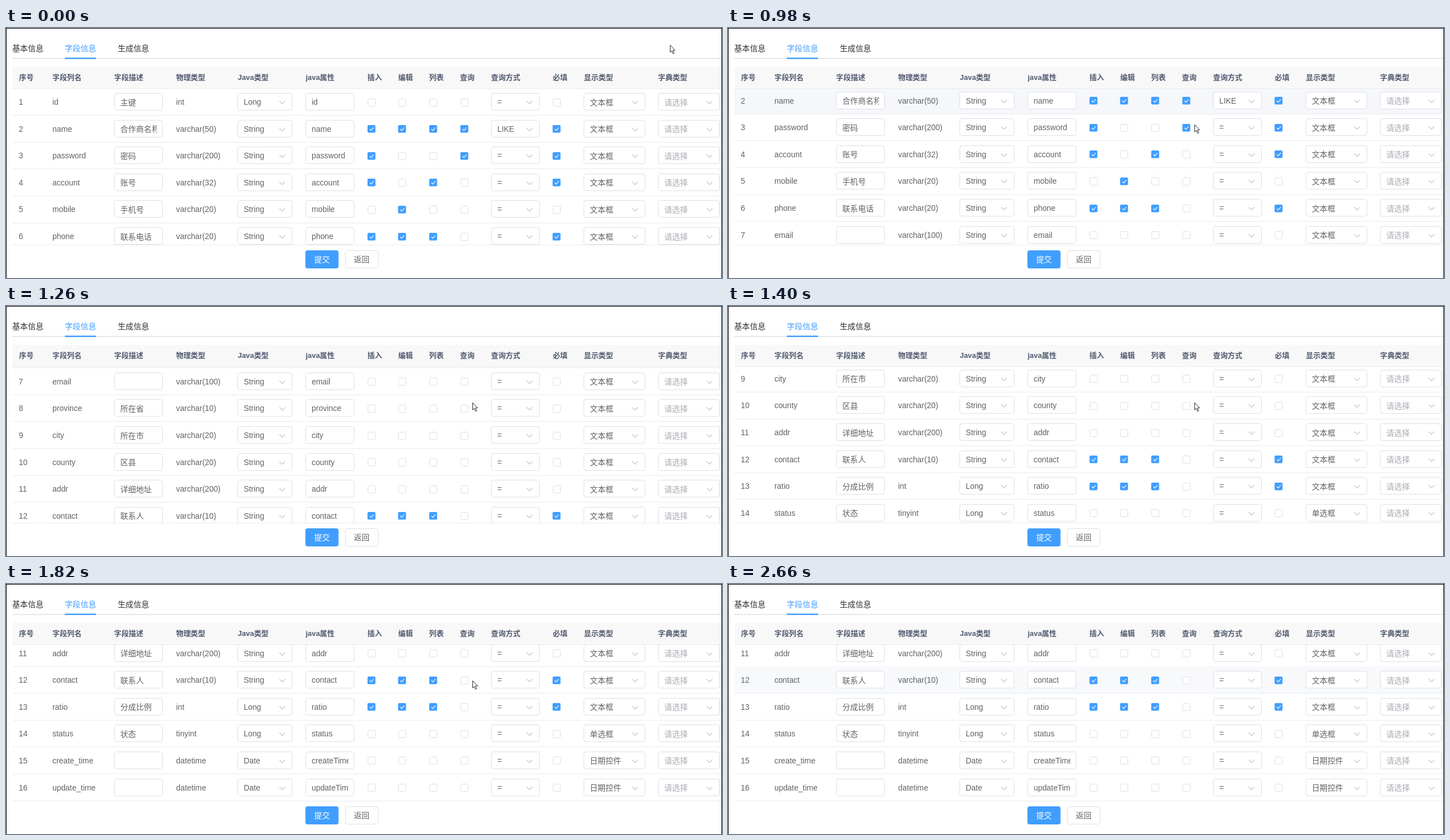
An HTML page with a canvas for the animation above (3.08 s loop, 1265x443 px).

```html
<!DOCTYPE html>
<html lang="zh-CN">
<head>
<meta charset="utf-8">
<title>字段信息</title>
<style>
html, body { margin: 0; width: 100%; height: 100%; overflow: hidden; background: #fff; }
canvas { display: block; }
</style>
</head>
<body>
<canvas id="stage" width="1265" height="443"></canvas>
<script>
const ctx = document.getElementById('stage').getContext('2d');
const FONT = '"Liberation Sans", "Noto Sans CJK SC", "Noto Sans CJK JP", sans-serif';
const BODY = `13.85px ${FONT}`;
const HEAD = `bold 12.9px ${FONT}`;
const BLUE = '#409eff', INK = '#606266', EDGE = '#dcdfe6', RULE = '#e8ebf1';
const LOOP = 3080;
const PITCH = 47.6, FIRST = 131;
const TOP = 108, BOTTOM = 384;

const headers = [
  [23, '序号'], [82, '字段列名'], [191, '字段描述'], [300.5, '物理类型'],
  [409.5, 'Java类型'], [529.5, 'java属性'], [638.5, '插入'], [693, '编辑'],
  [747.5, '列表'], [802, '查询'], [857, '查询方式'], [966, '必填'],
  [1021, '显示类型'], [1152, '字典类型']
];
const checkX = [639, 693, 748, 803, 966];

// column, description, SQL type, Java type, ticks, display type
const rows = [
  ['id', '主键', 'int', 'Long', '00000'],
  ['name', '合作商名称', 'varchar(50)', 'String', '11111'],
  ['password', '密码', 'varchar(200)', 'String', '10011'],
  ['account', '账号', 'varchar(32)', 'String', '10101'],
  ['mobile', '手机号', 'varchar(20)', 'String', '01000'],
  ['phone', '联系电话', 'varchar(20)', 'String', '11101'],
  ['email', '', 'varchar(100)', 'String', '00000'],
  ['province', '所在省', 'varchar(10)', 'String', '00000'],
  ['city', '所在市', 'varchar(20)', 'String', '00000'],
  ['county', '区县', 'varchar(20)', 'String', '00000'],
  ['addr', '详细地址', 'varchar(200)', 'String', '00000'],
  ['contact', '联系人', 'varchar(10)', 'String', '11101'],
  ['ratio', '分成比例', 'int', 'Long', '11101'],
  ['status', '状态', 'tinyint', 'Long', '00000', '单选框'],
  ['create_time', '', 'datetime', 'Date', '00000', '日期控件'],
  ['update_time', '', 'datetime', 'Date', '00000', '日期控件']
];

// Stepped tracks: [start ms, value]
const scrollTrack = [
  [0, 0], [980, 50], [1120, 178], [1260, 282.8], [1400, 383],
  [1540, 436], [1680, 483.6], [1820, 484.5]
];
const cursorTrack = [
  [0, [1173, 30]], [140, [848, 124]], [280, [824, 153]], [420, [824, 169]],
  [980, [824, 171]], [2240, [867, 159]], [2380, [1194, 62]],
  [2520, [1244, 38]], [2660, null]
];
const hoverTrack = [
  [0, null], [420, [2, '#f8f9fb']], [560, [2, '#f5f7fa']],
  [1120, null], [2240, [12, '#f7f9fb']]
];

function at(track, t) {
  let value = track[0][1];
  for (const [start, v] of track) if (t >= start) value = v;
  return value;
}

function rect(x, y, w, h, color) {
  ctx.fillStyle = color;
  ctx.fillRect(x, y, w, h);
}

function box(x, y, w, h, r, fill, edge) {
  ctx.beginPath();
  ctx.roundRect(x, y, w, h, r);
  ctx.fillStyle = fill;
  ctx.fill();
  if (!edge) return;
  ctx.strokeStyle = edge;
  ctx.lineWidth = 1;
  ctx.stroke();
}

function line(points, color, width) {
  ctx.beginPath();
  points.forEach(([x, y]) => ctx.lineTo(x, y));
  ctx.strokeStyle = color;
  ctx.lineWidth = width;
  ctx.stroke();
}

function text(str, x, mid, color = INK, font = BODY) {
  const drop = /[^\x00-\x7f]/.test(str) ? 5.5 : 5;
  ctx.font = font;
  ctx.fillStyle = color;
  ctx.fillText(str, x, Math.round(mid + drop));
}

function input(x, w, mid, str, color) {
  const y = Math.floor(mid - 15.5) + 0.5;
  box(x, y, w, 30, 4, '#fff', EDGE);
  ctx.save();
  ctx.beginPath();
  ctx.rect(x + 10, y, w - 20, 30);
  ctx.clip();
  text(str, x + 10.5, mid, color);
  ctx.restore();
}

function select(x, w, mid, str, color) {
  input(x, w, mid, str, color);
  const cx = x + w - 17.5, cy = Math.round(mid) + 0.5;
  line([[cx - 5, cy - 2], [cx, cy + 3], [cx + 5, cy - 2]], '#c0c4cc', 1.1);
}

function checkbox(x, mid, on) {
  const y = Math.round(mid - 6.5);
  if (!on) return box(x + 0.5, y + 0.5, 13, 13, 2, '#fff', EDGE);
  box(x - 0.3, y, 14, 13.6, 2, BLUE);
  line([[x + 3.6, y + 7], [x + 6.1, y + 9.6], [x + 10.6, y + 4.4]], '#fff', 1.1);
}

function drawRow(row, n, mid, hover) {
  const [name, note, sqlType, javaType, ticks, display = '文本框'] = row;
  const rule = Math.floor(mid + 23.6);
  if (hover && hover[0] === n) rect(11, rule - 47, 1253, 47, hover[1]);
  rect(11, rule, 1253, 1, RULE);
  text(String(n), 22.5, mid);
  text(name, 82, mid);
  input(191.5, 85, mid, note);
  text(sqlType, 300.5, mid);
  select(409.5, 96, mid, javaType);
  input(529.5, 85.5, mid, name.replace(/_(.)/, (m, c) => c.toUpperCase()));
  checkX.forEach((x, i) => checkbox(x, mid, ticks[i] === '1'));
  select(857.5, 85, mid, name === 'name' ? 'LIKE' : '=');
  select(1021, 108, mid, display);
  select(1152.5, 108, mid, '请选择', '#a8abb2');
}

function drawTable(scroll, hover) {
  ctx.save();
  ctx.beginPath();
  ctx.rect(11, TOP, 1253, BOTTOM - TOP);
  ctx.clip();
  rows.forEach((row, i) => {
    const mid = FIRST + i * PITCH - scroll;
    if (mid > TOP - 30 && mid < BOTTOM + 30) drawRow(row, i + 1, mid, hover);
  });
  ctx.restore();
  rect(11, 69, 1253, 38, '#f8f8f9');
  rect(11, 107, 1253, 1, RULE);
  headers.forEach(([x, str]) => text(str, x, 86.5, '#515a6e', HEAD));
  rect(11, BOTTOM, 1253, 1, RULE);
}

function drawPage() {
  rect(0, 0, 1265, 443, '#fff');
  text('基本信息', 11, 35, '#303133');
  text('字段信息', 104, 35, BLUE);
  text('生成信息', 197.5, 35, '#303133');
  rect(11, 53, 1253, 2, '#e4e7ed');
  rect(104, 52.5, 55, 2.5, BLUE);
  box(529, 394, 58.5, 32, 4, BLUE);
  text('提交', 544.5, 409.4, '#fff');
  box(599.5, 394.5, 58, 31, 4, '#fff', EDGE);
  text('返回', 614.5, 409.4);
}

function drawFrameEdge() {
  rect(0, 0, 1265, 1, '#000');
  rect(0, 0, 1, 443, '#000');
  rect(1264, 0, 1, 443, '#000');
}

function drawCursor([x, y]) {
  ctx.save();
  ctx.translate(x + 0.5, y + 0.5);
  ctx.beginPath();
  [[0, 0], [0, 12.6], [2.9, 10], [5, 15], [7, 14.2], [4.9, 9.3], [8.7, 9]]
    .forEach(([px, py]) => ctx.lineTo(px, py));
  ctx.closePath();
  ctx.fillStyle = '#fff';
  ctx.fill();
  ctx.strokeStyle = '#111';
  ctx.lineWidth = 0.9;
  ctx.stroke();
  ctx.restore();
}

function draw(t) {
  drawPage();
  drawTable(at(scrollTrack, t), at(hoverTrack, t));
  drawFrameEdge();
  const cursor = at(cursorTrack, t);
  if (cursor) drawCursor(cursor);
}

const begin = performance.now();
function tick() {
  draw((performance.now() - begin) % LOOP);
  requestAnimationFrame(tick);
}
tick();
</script>
</body>
</html>
```
